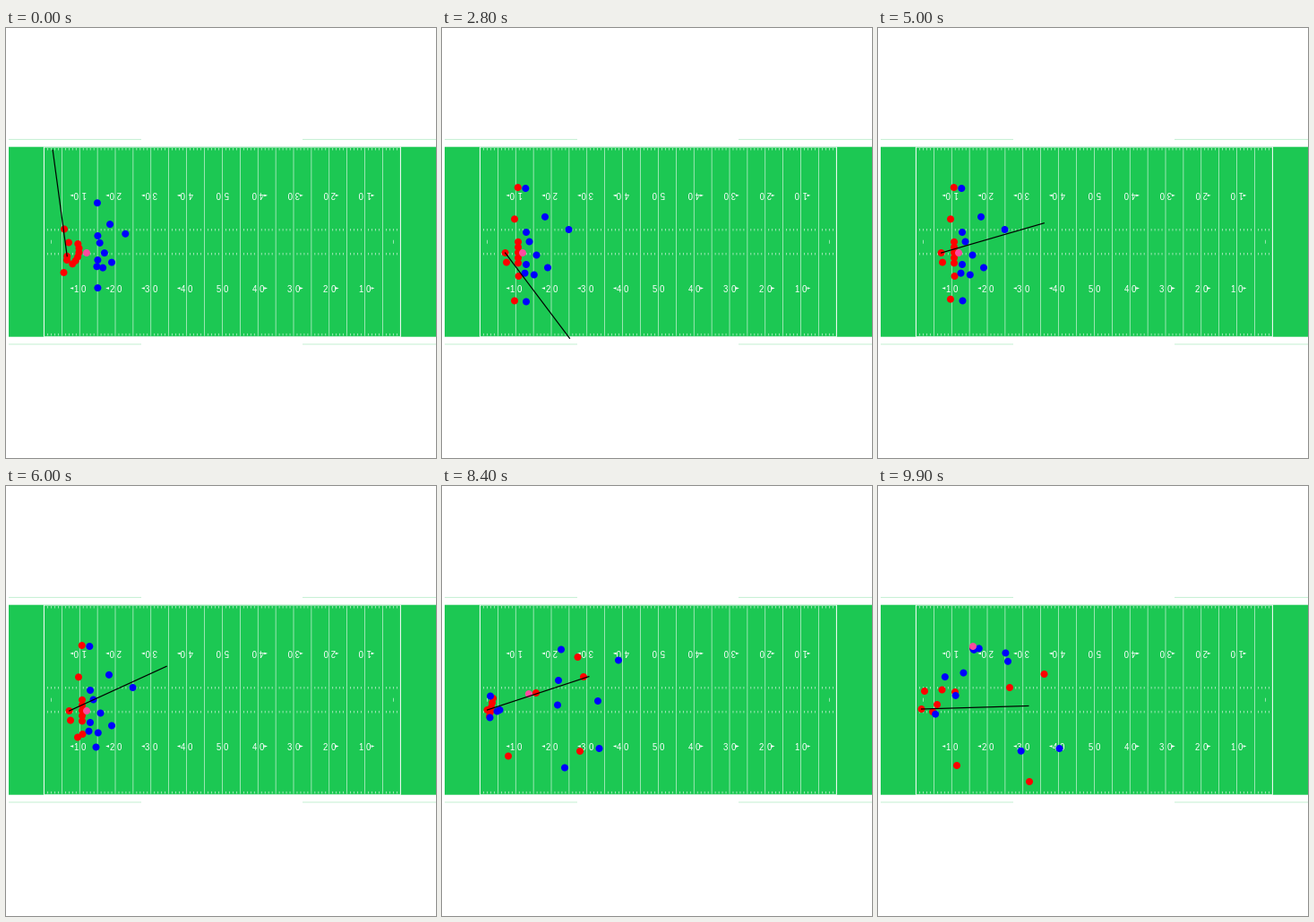
A matplotlib script that plays this animation: 480 by 480 pixels, repeating every 10000 ms.

```python
import numpy as np
import matplotlib.pyplot as plt
from matplotlib.animation import FuncAnimation
from matplotlib.patches import Polygon, Rectangle

SIZE, DPI, FRAMES, STEP = 480, 100, 100, 100
PX = 72 / DPI
GREEN, PALE = "#1cc853", "#c4f0d2"
RED, BLUE, PINK = "#ff0000", "#0000ff", "#ff4a9e"
LEFT, TOP, BOTTOM, YARD = 42.4, 132.7, 344.7, 3.98
MID = (TOP + BOTTOM) / 2
SNAP, THROW, BREAK, CATCH, END = 6.8, 8.05, 8.4, 8.46, 9.9
TACKLE = np.array([106, 181])
GAZE = 30 * YARD
clock = np.arange(FRAMES) * STEP / 1000


def progress(start, stop):
    return np.clip((clock - start) / (stop - start), 0, 1)[:, None]


def smooth(start, stop):
    u = progress(start, stop)
    return u * u * (3 - 2 * u)


tracks, colors = [], []


def add(color, huddle, stance, depth, end, arrive=1.6, pace=1, shift=(0, 0)):
    """Huddle, line up, shift before the snap, run to depth, then to the end."""
    huddle, stance, depth, end, shift = map(np.array, (huddle, stance, depth, end, shift))
    track = (huddle + (stance - huddle) * (1 - (1 - progress(0, arrive)) ** 1.4)
             + shift * smooth(4.8, 6)
             + (depth - stance - shift) * progress(SNAP, BREAK) ** pace
             + (end - depth) * progress(BREAK, END))
    tracks.append(track)
    colors.append(color)
    return track


def ring(k):
    """Place of the k-th blocker in the huddle."""
    a = np.radians(14.5 * k - 21)
    return 62 + 19.6 * np.cos(a), 248 + 19.6 * np.sin(a)


def receiver(huddle, stance, depth, end, **kw):
    return add(RED, huddle, stance, depth, end, arrive=2.2, pace=1.65, **kw)


def defender(stance, depth, chase, drift=0, **kw):
    """Starts bunched, drops or rushes, then chases the ball carrier."""
    stance, depth = np.array(stance), np.array(depth)
    huddle = stance + (np.array([118, 244]) - stance) * (.35, .25)
    end = depth + (TACKLE - depth) * chase + (drift, 0)
    return add(BLUE, huddle, stance, depth, end, **kw)


# Offence: five blockers give ground evenly, then turn upfield
for k, end in enumerate([(86, 230), (71.5, 227.5), (66, 244), (61, 252), (52, 229)]):
    add(RED, ring(k), (85, 238.8 + 5.9 * k), (57 - k, 237 + 5 * k), end)
tight = receiver(ring(5), (85.5, 277), (105, 231), TACKLE)
passer = add(RED, (68.2, 254.7), (70.6, 251), (50.5, 250), (48.5, 249))
receiver((68, 259), (72, 261.6), (74, 301.5), (88, 312))
receiver((65, 224.5), (84.7, 178), (151.5, 191), (147, 225))
receiver((70, 239.5), (81, 213.3), (158, 213), (185.5, 210))
receiver((64.5, 273), (81, 304.5), (154, 296), (169, 330), shift=(-1, -24))

# Defence: four rushers, three linebackers, four backs
defender((94, 228), (54, 234.5), .4)
defender((97.5, 238.5), (64.5, 250), .6, drift=6)
defender((94, 264), (61.5, 251.5), .25, drift=14)
defender((92.5, 273.7), (53.5, 258.5), .05, drift=8, pace=2.2)
defender((105.5, 253.5), (174, 240), .75, drift=22)
defender((102.8, 275.5), (129, 244.5), .98, pace=1.5)
defender((118, 267.5), (175.5, 293), 0, drift=27, pace=1.2)
wide = dict(arrive=2.3, pace=1.7)
defender((93.3, 179), (133, 182.5), .75, **wide)
defender((115, 210.8), (130, 217), .95, arrive=2.3)
defender((141.5, 225), (197, 194.5), .6, arrive=2.3)
defender((94, 305.5), (137, 314.5), .14, drift=27, shift=(6.5, -14), **wide)

# Ball: on the spot, snapped, held, thrown, carried
spot = np.array([90, 251])
ball = spot + (passer - (1, 0) - spot) * progress(SNAP, SNAP + .3)
tracks.append(ball + (tight - (0, 2) - ball) * progress(THROW, CATCH))
colors.append(PINK)
tracks = np.array(tracks)

# Passer's gaze: each look is a time and a heading in degrees
looks = [(0, 97.7), (.9, 338), (1.2, 321), (2.1, 358), (2.8, 307), (3.4, 359),
         (6, 384.6), (7.5, 369.6), (BREAK, 378.2), (8.85, 423), (END, 361.7)]
heading = looks[0][1] + sum((b - a) * smooth(t0, t1)
                            for (t0, a), (t1, b) in zip(looks, looks[1:]))
heading = np.radians(heading)
tip = passer + GAZE * np.hstack([np.cos(heading), -np.sin(heading)])

fig = plt.figure(figsize=(SIZE / DPI, SIZE / DPI), dpi=DPI, facecolor="white")
ax = fig.add_axes([0, 0, 1, 1])
ax.set(xlim=(0, SIZE), ylim=(SIZE, 0))
ax.axis("off")


def yard_x(n):
    return LEFT + n * YARD


def vlines(xs, y0, y1, width=.55):
    ax.vlines(xs, y0, y1, colors="white", lw=width * PX, zorder=2).set_snap(False)


def hline(x0, x1, y, color, width=1):
    ax.hlines(y, x0, x1, colors=color, lw=width * PX, zorder=2).set_snap(False)


def arrow(x, y, way):
    ax.add_patch(Polygon([(x + 2 * way, y), (x - 1.8 * way, y - 1.3),
                          (x - 1.8 * way, y + 1.3)], color="white", lw=0, zorder=3))


def draw_number(n):
    x, tens = yard_x(n), min(n, 100 - n) // 10
    for side, y, turn in ((-1, 184.8, 180), (1, 292, 0)):
        for digit, dx in ((tens, -4.2), (0, 4.2)):
            ax.text(x + dx * side, y, str(digit), color="white",
                    family="Liberation Sans", size=9.7 * PX, rotation=turn,
                    ha="center", va="center", zorder=3)
        if n != 50:
            way = 1 if n > 50 else -1
            arrow(x + 8.8 * way, MID + 51.8 * side, way)


def draw_field():
    ax.add_patch(Rectangle((3, TOP), SIZE - 3, BOTTOM - TOP, color=GREEN, lw=0,
                           snap=False))
    for side in (-1, 1):
        y = MID + 114.3 * side
        hline(3, 151, y, PALE)
        hline(331, SIZE, y, PALE)
        hline(LEFT, yard_x(100), MID + 105.6 * side, "white", .7)
    vlines([yard_x(0), yard_x(100)], TOP, BOTTOM, 1)
    vlines([yard_x(n) for n in range(5, 100, 5)], TOP + 1, BOTTOM - 1)
    ticks = [yard_x(n) for n in range(1, 100) if n % 5]
    for far in (12.2, 102.2):
        for side in (-1, 1):
            vlines(ticks, MID + far * side, MID + (far + 2.5) * side)
    vlines([yard_x(2), yard_x(98)], MID - 2, MID + 2)
    for n in range(10, 100, 10):
        draw_number(n)


draw_field()
dots = ax.scatter(*tracks[:, 0].T, s=(8 * PX) ** 2, c=colors, lw=0, zorder=4)
gaze, = ax.plot([], [], color="black", lw=1.2 * PX, zorder=5)
gaze.set_clip_path(Rectangle((2.5, 124), SIZE, 229, transform=ax.transData))


def draw(i):
    dots.set_offsets(tracks[:, i])
    gaze.set_data(*zip(passer[i], tip[i]))
    return dots, gaze


anim = FuncAnimation(fig, draw, frames=FRAMES, interval=STEP,
                     init_func=lambda: draw(0), repeat=True, repeat_delay=0)
plt.show()
```
